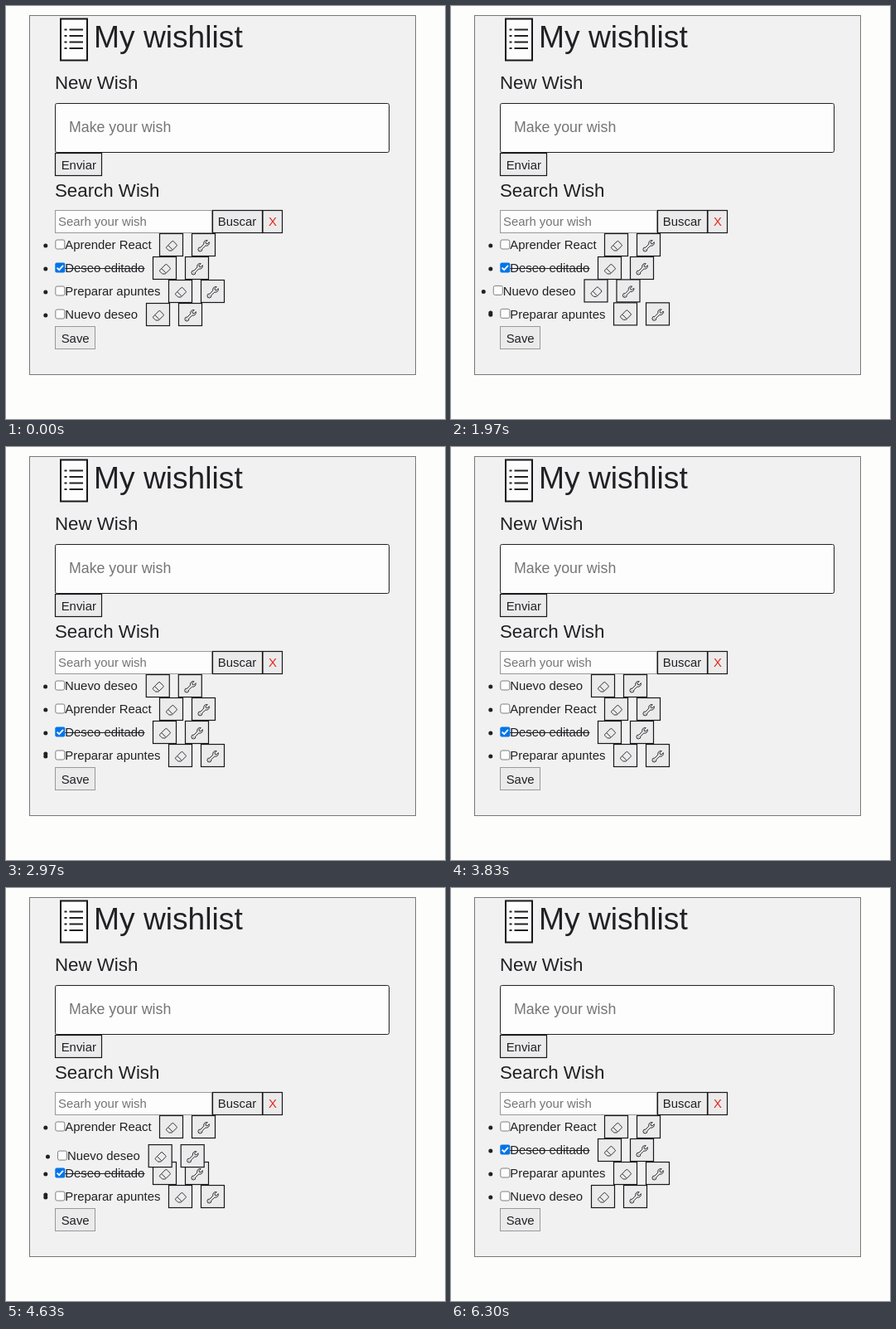
An HTML page for the animation above (6.33 s loop, 530 px wide and 498 px high).

```html
<!DOCTYPE html>
<html lang="en">
<head>
<meta charset="utf-8">
<title>My wishlist</title>
<style>
  html, body { margin: 0; width: 100%; height: 100%; overflow: hidden; background: #fdfdfc; }
  svg { display: block; font: 14.9px "Liberation Sans", Arial, sans-serif; fill: #212125; }
  .title { font-size: 37.2px; }
  .head { font-size: 22.3px; }
  .hint { fill: #757575; }
  .btn { fill: #ebebec; stroke: #18181c; stroke-width: 1.2; }
  .field { fill: #fdfdfd; stroke: #222; }
  .soft { stroke: #999; stroke-width: 1; }
  .icon { fill: none; stroke: #222226; stroke-linejoin: round; }
</style>
</head>
<body>
<svg width="530" height="498" viewBox="0 0 530 498">
  <defs>
    <path id="eraser" class="icon" d="M8.4 2.6a1.5 1.5 0 0 1 2.1 0l3.9 3.9a1.5 1.5 0 0 1 0 2.1l-5.5 5.5a1.5 1.5 0 0 1-1 .4H5.1a1.5 1.5 0 0 1-1-.4l-2.5-2.5a1.5 1.5 0 0 1 0-2.1zM3.8 7.9l5.3 5.3"/>
    <path id="wrench" class="icon" d="M12.6 1.2L10.2 3.6l.5 1.7 1.7.5L14.8 3.4A3.8 3.8 0 0 1 10.1 8.1L5.6 12.3A2.6 2.6 0 1 1 3.7 10.4L7.9 5.9A3.8 3.8 0 0 1 12.6 1.2zM2.6 13.2h.8"/>
  </defs>
  <rect x="28.5" y="11.5" width="466" height="433" fill="#f1f1f1" stroke="#777"/>
  <rect x="66" y="15.5" width="32" height="50" fill="#fdfdfd" stroke="#18181c" stroke-width="2"/>
  <path d="M76.5 28.5H93M76.5 36H93M76.5 43.5H93M76.5 51H93" stroke="#222" stroke-width="2"/>
  <path d="M70.5 28.5h3M70.5 36h3M70.5 43.5h3M70.5 51h3" stroke="#222" stroke-width="2.2"/>
  <text class="title" x="106" y="50">My wishlist</text>
  <text class="head" x="59" y="100">New Wish</text>
  <rect class="field" x="59.5" y="117.5" width="403" height="59" rx="2"/>
  <text class="hint" x="76" y="152" font-size="17.75">Make your wish</text>
  <rect class="btn" x="59.5" y="177.5" width="56" height="27"/>
  <text x="66.7" y="196.5">Enviar</text>
  <text class="head" x="59" y="230">Search Wish</text>
  <rect class="field soft" x="59.5" y="246.5" width="189" height="27"/>
  <text class="hint" x="63" y="265">Searh your wish</text>
  <rect class="btn" x="249.5" y="246.5" width="60" height="27"/>
  <text x="255.8" y="265">Buscar</text>
  <rect class="btn" x="310" y="246.5" width="23.5" height="27"/>
  <text x="317" y="265" style="fill:#e8261c">X</text>
  <rect class="btn soft" x="59.5" y="386.5" width="48" height="27"/>
  <text x="66.7" y="405.5">Save</text>
  <circle id="spare" cx="47.8" cy="370" r="2.5"/>
  <g id="list"></g>
</svg>
<script>
const LOOP = 6330, SHIFT = 200, DROP = 330;

// Keyed steps: [start time, row centre]; each change eases over SHIFT.
const wishes = [
  { label: 'Aprender React', tools: 185.5, steps: [[0, 288], [2350, 316], [4350, 288]] },
  { label: 'Deseo editado', tools: 177.5, done: true, steps: [[0, 316], [2110, 344], [4720, 316]] },
  { label: 'Preparar apuntes', tools: 196.5, steps: [[0, 344], [1820, 372], [5092, 344]] },
  { label: 'Nuevo deseo', tools: 169.5 }
];

// Pointer paths of the dragged wish: [time, x offset, row centre].
const drags = [
  [[1650, 0, 372], [1820, -8, 358], [2110, -9, 330], [2350, -5, 302],
   [2430, -3.8, 296.5], [2600, -5, 290], [2750, -5, 289]],
  [[4100, 0, 288], [4220, -6, 292], [4350, -4, 302], [4630, 2.7, 323],
   [5092, 0, 358], [5230, -1, 366], [5400, -1, 371], [5500, -1, 371]]
];

const tool = (x, icon) =>
  `<rect class="btn" x="${x}" y="-13.5" width="28" height="27"/>
   <use href="#${icon}" transform="translate(${x + 7} -6.5) scale(.93)"/>`;

const box = done => done
  ? `<rect x="59.3" y="-6.5" width="12" height="12" rx="2" fill="#0075e8"/>
     <path d="M61.6 -.4l2.6 2.6 4.8-5.4" fill="none" stroke="#fff" stroke-width="1.8"/>`
  : `<rect x="59.8" y="-6" width="11" height="11" rx="2" fill="#fdfdfd" stroke="#808080"/>`;

const list = document.getElementById('list');
list.innerHTML = wishes.map(w =>
  `<g><circle cx="47.8" cy="1" r="2.5"/>${box(w.done)}
   <text x="71.3" y="5.3">${w.label}</text>
   ${w.done ? '<path d="M71.3 .5h96.2" stroke="#212125"/>' : ''}
   ${tool(w.tools, 'eraser')}${tool(w.tools + 39, 'wrench')}</g>`).join('');
const rows = [...list.children];
const spare = document.getElementById('spare');

const mix = (a, b, k) => a + (b - a) * k;

// cubic-bezier(.2, 0, 0, 1)
function ease(k) {
  if (k <= 0 || k >= 1) return Math.min(1, Math.max(0, k));
  let lo = 0, hi = 1;
  for (let i = 0; i < 20; i++) {
    const s = (lo + hi) / 2;
    if (.6 * s * (1 - s) ** 2 + s ** 3 < k) lo = s; else hi = s;
  }
  return 3 * lo * lo * (1 - lo) + lo ** 3;
}

const rowY = (steps, t) => steps.reduce(
  (y, [start, to]) => t >= start ? mix(y, to, start ? ease((t - start) / SHIFT) : 1) : y, steps[0][1]);

function dragged(t) {
  let home = 372;
  for (const path of drags) {
    const end = path[path.length - 1];
    if (t < path[0][0]) break;
    const target = 660 - home;
    if (t < end[0]) {
      const i = path.findIndex(p => p[0] > t);
      const a = path[i - 1], b = path[i], k = (t - a[0]) / (b[0] - a[0]);
      return { x: mix(a[1], b[1], k), y: mix(a[2], b[2], k), active: true };
    }
    if (t < end[0] + DROP) {
      const k = ease((t - end[0]) / DROP);
      return { x: mix(end[1], 0, k), y: mix(end[2], target, k), active: true };
    }
    home = target;
  }
  return { x: 0, y: home, active: false };
}

function draw(t) {
  const d = dragged(t);
  wishes.forEach((w, i) => {
    const [x, y] = w.steps ? [0, rowY(w.steps, t)] : [d.x, d.y];
    rows[i].setAttribute('transform', `translate(${x} ${y})`);
  });
  spare.setAttribute('visibility', d.active ? 'visible' : 'hidden');
}

const begin = performance.now();
function tick() {
  draw((performance.now() - begin) % LOOP);
  requestAnimationFrame(tick);
}
draw(0);
requestAnimationFrame(tick);
</script>
</body>
</html>
```
